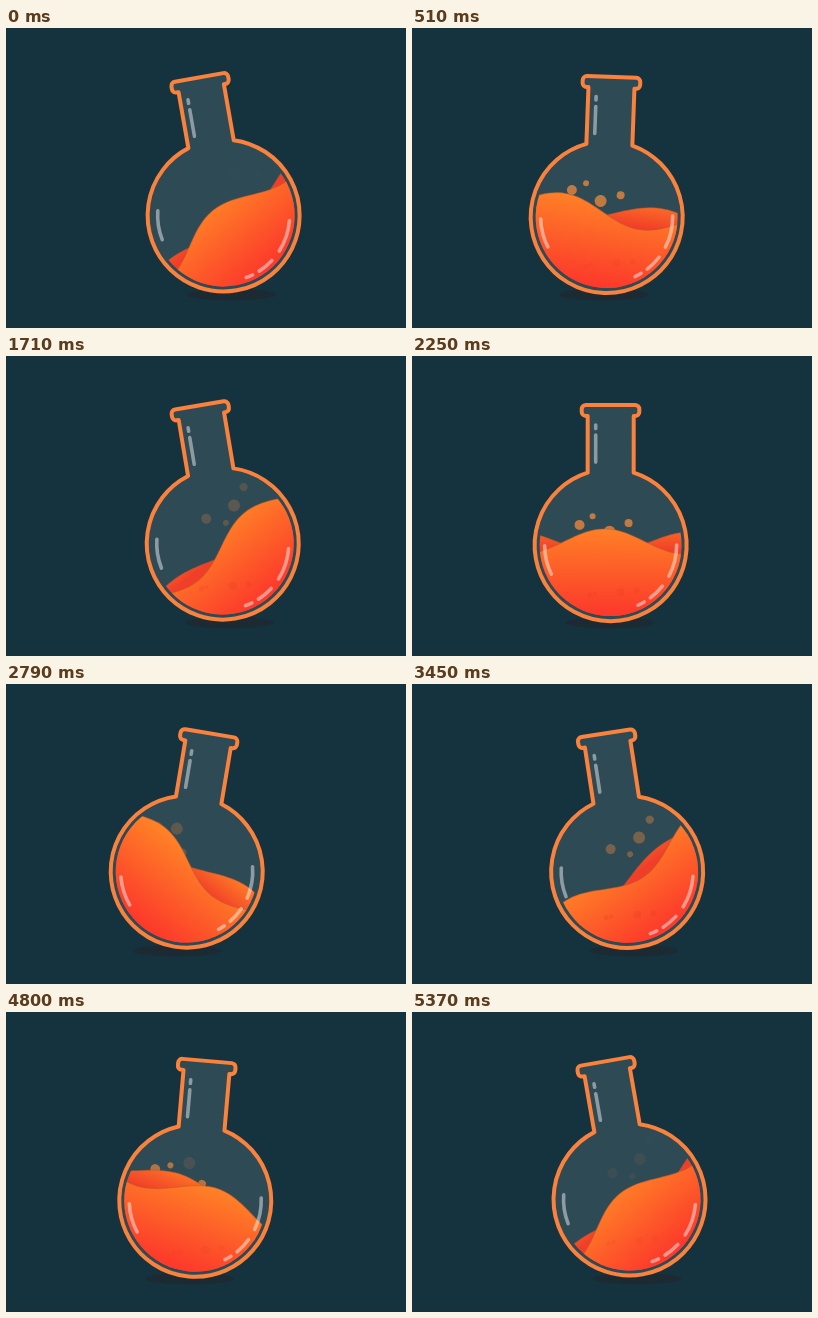
Recreate the animation shown at these times as an HTML page. Size 400 px wide and 300 px high, loop 5.4 s.

```html
<!DOCTYPE html>
<html lang="en">
<head>
<meta charset="utf-8">
<title>Rocking flask</title>
<style>
  html, body { margin: 0; width: 100%; height: 100%; overflow: hidden; background: #14333f; }
  svg { display: block; width: 100vw; height: 100vh; }
  .shine { fill: none; stroke: #fff; stroke-opacity: .45; stroke-width: 3.6; stroke-linecap: round; }
  .wave { stroke: #b8592a; stroke-opacity: .5; stroke-width: 1; }
</style>
</head>
<body>
<svg viewBox="0 0 400 300">
  <defs>
    <linearGradient id="frontFill" gradientUnits="userSpaceOnUse" x1="0" y1="-22" x2="0" y2="68">
      <stop offset="0" stop-color="#ff8426"/>
      <stop offset="1" stop-color="#fc3a2b"/>
    </linearGradient>
    <linearGradient id="backFill" gradientUnits="userSpaceOnUse" x1="0" y1="-27" x2="0" y2="6">
      <stop offset="0" stop-color="#ff7c26"/>
      <stop offset="1" stop-color="#f03f28"/>
    </linearGradient>
    <clipPath id="bowl"><circle r="71"/></clipPath>
  </defs>

  <ellipse id="shadow" cy="266.7" rx="44.5" ry="5.8" fill="#1c2b33"/>

  <!-- flask space: origin at the pivot in the neck, bowl centre 109 below -->
  <g id="flask">
    <path fill="#2e4a55" stroke="#fb823c" stroke-width="4" stroke-linejoin="round"
      d="M-23 36.6V-20.2H-25A4 4 0 0 1 -29 -24.2V-27A4.2 4.2 0 0 1 -24.8 -31.2H24.4A4.2 4.2 0 0 1 28.6 -27V-24.2A4 4 0 0 1 24.6 -20.2H23V36.6A76 76 0 1 1 -23 36.6Z"/>
    <path class="shine" d="M-15 -11V-7.5M-15 -1V26"/>
    <g transform="translate(0 109)">
      <g clip-path="url(#bowl)">
        <g id="liquid">
          <g id="air"></g>
          <path id="back" class="wave" fill="url(#backFill)"/>
          <path id="front" class="wave" fill="url(#frontFill)"/>
        </g>
      </g>
      <g id="deep"></g>
      <path id="shine" class="shine"/>
    </g>
  </g>
</svg>
<script>
const LOOP = 5400, ROCK = 1800, TAU = 2 * Math.PI;
const $ = id => document.getElementById(id);

// bubbles: x, radius
const air = [[-31, 5], [-18, 3], [-1, 6], [18, 4]];
const deep = [[-21, 2.5], [-16, 1.8], [10, 4], [26, 2.8]];

function dots(list, id, fill) {
  return list.map(([, r]) => {
    const c = document.createElementNS('http://www.w3.org/2000/svg', 'circle');
    c.setAttribute('r', r);
    c.setAttribute('fill', fill);
    return $(id).appendChild(c);
  });
}
const airDots = dots(air, 'air', '#f58a3c');
const deepDots = dots(deep, 'deep', '#e03a24');

function place(c, x, y, alpha) {
  c.setAttribute('cx', x);
  c.setAttribute('cy', y);
  c.setAttribute('opacity', alpha);
}

function arc(from, to, r = 66) {
  const at = deg => {
    const a = deg * TAU / 360;
    return (r * Math.cos(a)).toFixed(2) + ' ' + (r * Math.sin(a)).toFixed(2);
  };
  return `M${at(from)}A${r} ${r} 0 0 1 ${at(to)}`;
}
$('shine').setAttribute('d', arc(154, 179.5) + arc(0, 28) + arc(38.5, 53) + arc(59.5, 65.5));

function wave(length, crest, level, amp) {
  let d = 'M-80 90';
  for (let x = -80; x <= 80; x += 4) {
    const y = level - amp * Math.cos(TAU * (x - crest) / length);
    d += `L${x} ${y.toFixed(2)}`;
  }
  return d + 'L80 90Z';
}

const turn = (id, deg) => $(id).setAttribute('transform', `rotate(${deg})`);

function draw(t) {
  const u = t / LOOP;
  const swing = Math.cos(TAU * t / ROCK);
  const tilt = -10 * swing;

  $('shadow').setAttribute('cx', 197.6 + 27.8 * swing);
  $('flask').setAttribute('transform', `translate(198.7 80.1) rotate(${tilt})`);
  turn('liquid', 3 * tilt);
  turn('shine', -1.45 * tilt);
  turn('deep', -tilt);

  // both waves drift left by two lengths per loop, with a little sway
  const frontCrest = -6 - 320 * u - .6 * (tilt + 10) - 22 * Math.sin(Math.PI * u) ** 2;
  const backCrest = 85 - 360 * u - 35 * Math.sin(TAU * (u - .1));
  $('front').setAttribute('d', wave(160, frontCrest, -3.7 - .55 * tilt, 12.5));
  $('back').setAttribute('d', wave(180, backCrest, -2.7 - 1.05 * tilt, 11 + .2 * tilt));

  // air bubbles show while the flask is near upright
  const upright = Math.sqrt(1 - swing * swing);
  air.forEach(([x], i) => {
    const p = (t / 900 + .92 + i * .36) % 1;
    place(airDots[i], x - 3.5 * tilt, -10 - 24 * p, .75 * upright * Math.min(1, 8 * (1 - p)));
  });

  const p = t / 900 % 1;
  const fade = (.2 + .15 * swing) * Math.sqrt(Math.sin(Math.PI * p));
  deep.forEach(([x], i) => place(deepDots[i], x, 56 - 12 * p - i * 1.5, fade));
}

const start = performance.now();
function tick() {
  draw((performance.now() - start) % LOOP);
  requestAnimationFrame(tick);
}
tick();
</script>
</body>
</html>
```
